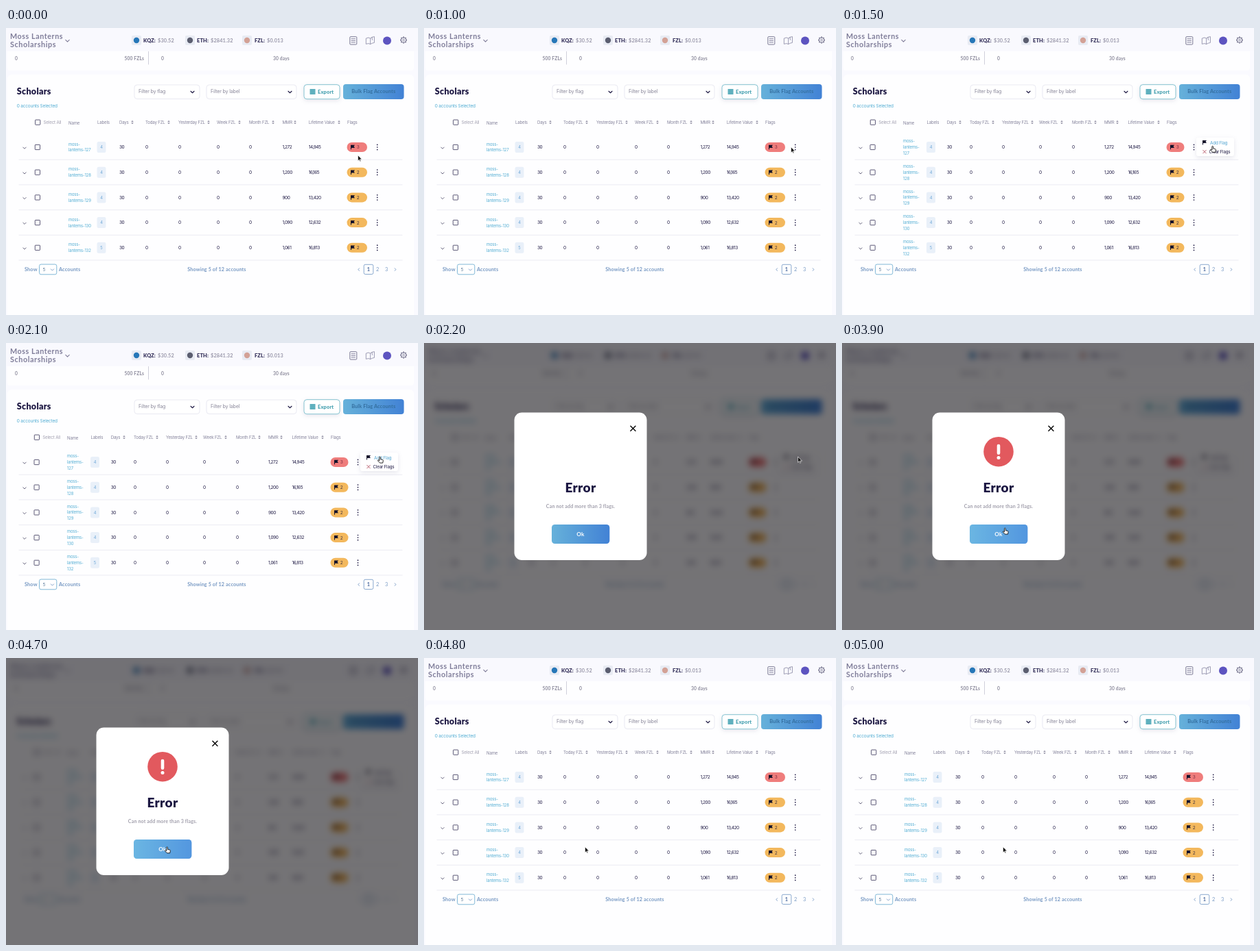
Recreate the animation shown at these times as an HTML page. Size 600 px wide and 419 px high, loop 5.2 s.

```html
<!DOCTYPE html>
<html lang="en">
<head>
<meta charset="utf-8">
<title>Scholars</title>
<style>
  html, body { margin: 0; width: 100%; height: 100%; overflow: hidden; background: #fafaff; }
  svg { display: block; width: 100vw; height: 100vh; }
  text { font-family: Inter, "Open Sans", sans-serif; letter-spacing: -.03em; white-space: pre; }
  .head { font-family: Lato, "Open Sans", sans-serif; letter-spacing: .02em; }
  .title { letter-spacing: .05em; }
  .cell { letter-spacing: -.07em; }
  .soft { filter: drop-shadow(0 2px 3px rgba(60, 60, 110, .13)); }
</style>
</head>
<body>
<svg id="stage" viewBox="0 0 600 419" preserveAspectRatio="none"></svg>
<script>
const LOOP = 5200, STEP = 100;
const INK = '#1d1843', GREY = '#8b899b', BLUE = '#4fabd2', LINE = '#e9e9f2', CARD = '#fefeff';
const TEAM = ['Moss', 'Lanterns'], COIN = 'FZL';

// Drawing helpers
const text = (x, y, s, size, fill = INK, extra = '') =>
  `<text x="${x}" y="${y}" font-size="${size}" fill="${fill}" ${extra}>${s}</text>`;
const head = (x, y, s, size, fill = INK, weight = 700, extra = '', kind = '') =>
  text(x, y, s, size, fill, `class="head ${kind}" font-weight="${weight}" ${extra}`);
const rect = (x, y, w, h, r, fill, stroke = 'none', extra = '') =>
  `<rect x="${x}" y="${y}" width="${w}" height="${h}" rx="${r}" fill="${fill}" stroke="${stroke}" ${extra}/>`;
const path = (d, fill, stroke = 'none', width = 1, extra = '') =>
  `<path d="${d}" fill="${fill}" stroke="${stroke}" stroke-width="${width}" stroke-linecap="round" stroke-linejoin="round" ${extra}/>`;
const dot = (x, y, r, fill) => `<circle cx="${x}" cy="${y}" r="${r}" fill="${fill}"/>`;
const chevron = (x, y, w = 2.5, color = INK, width = 1.1) =>
  path(`M${x - w} ${y - w / 2}l${w} ${w} ${w} ${-w}`, 'none', color, width);
const cross = (x, y, r, color, width) =>
  path(`M${x - r} ${y - r}l${2 * r} ${2 * r}m0 ${-2 * r}l${-2 * r} ${2 * r}`, 'none', color, width);
const checkbox = (x, y) => rect(x, y - 3.6, 7.2, 7.2, .6, '#fff', '#4a4768', 'stroke-width=".9"');
const flag = (x, y) => path(`M${x} ${y + 3.3}v-6.5h6l-1.5 2 1.5 2.1h-5v2.4z`, '#14122b');
const sorter = (x, y) => path(`M${x - 1.8} ${y - .6}l1.8-2 1.8 2zm0 1.3l1.8 2 1.8-2z`, '#8a889d');
const middle = 'text-anchor="middle"';

function topBar() {
  const coins = [
    ['KQZ', '$30.52', 183, 200, 221, '#2677b8'],
    ['ETH', '$2841.32', 261, 278, 298, '#5b5e70'],
    [COIN, '$0.013', 344, 362, 380, '#d3a196']
  ];
  const icon = '#7b7993', name = '#807e9a';
  let teeth = '';
  for (let a = 0; a < 360; a += 45)
    teeth += `<path d="M579 12.6v1.6" stroke="${icon}" stroke-width="1.8" transform="rotate(${a} 579 17.6)"/>`;
  return rect(0, 0, 600, 34, 0, '#f9f9fe') +
    head(6, 16, TEAM.join(' '), 10.8, name, 700, '', 'title') +
    head(6, 27.8, 'Scholarships', 10.9, name, 700, '', 'title') +
    chevron(89.5, 18.8, 2.7, name) +
    coins.map(([code, price, bx, nx, px, color]) =>
      rect(bx, 11, 14, 14, 2, '#e8ebf3') + dot(bx + 7, 18, 4.2, color) +
      head(nx, 21, code + ':', 7.4, '#3a365f', 900) +
      head(px, 21, price, 7.3, '#9a98aa')).join('') +
    rect(500.8, 12.7, 10, 11.4, 1, 'none', icon) +
    path('M503 15.8h5.5M503 18.4h5.5M503 21h5.5', 'none', icon, .9) +
    path('M524.7 15l3.3-1 2.6 1.2 2.5-1.8 3.3-.8v8.8l-3 .8-2.8 1.4-2.7-1-3.2.7zM530.6 15.2v8.2M533 13.4l.4 4', 'none', '#8684a0', .8) +
    dot(555, 18.6, 6, '#5d54c0') +
    teeth + `<circle cx="579" cy="17.6" r="3.7" fill="none" stroke="${icon}"/>` +
    `<circle cx="579" cy="17.6" r="1.4" fill="none" stroke="${icon}" stroke-width=".8"/>`;
}

function panels() {
  return rect(2, 30, 592, 32, 4, CARD) + topBar() +
    head(13, 47, '0', 6.7, GREY) + head(172.5, 47, `500 ${COIN}s`, 6.7, GREY) +
    path('M207.5 34.5V53', 'none', '#d0cfda', 1) +
    head(226, 47, '0', 6.7, GREY) + head(389, 47, '30 days', 6.7, GREY) +
    rect(2, 68, 592, 365, 6, CARD) +
    head(15.8, 96.5, 'Scholars', 12.6, INK, 900) +
    rect(187, 83, 95, 20.5, 4, '#fff', LINE) + text(193, 95.4, 'Filter by flag', 7.2, GREY) + chevron(271.5, 93.5) +
    rect(292, 83, 131, 20.5, 4, '#fff', LINE) + text(298, 95.4, 'Filter by label', 7.2, GREY) + chevron(413.5, 93.5) +
    rect(434, 82.7, 52, 21, 4, '#fff', '#79bdcc', 'class="soft" stroke-width=".9"') +
    rect(442.5, 89, 8, 8, .5, '#5fb0be') + head(454, 95.5, 'Export', 7.4, '#4fa5b4', 900) +
    rect(491, 82, 88.5, 22, 4, 'url(#button)') +
    head(535.2, 95.4, 'Bulk Flag Accounts', 7.3, '#346f9f', 700, middle) +
    text(15.8, 116.3, '0 accounts Selected', 6.5, BLUE) + footer();
}

function footer() {
  const soft = '#7698c3';
  return head(27, 354.8, 'Show', 7.3, soft) +
    rect(48.5, 345, 25.3, 14.8, 2.5, '#fff', '#72afd2', 'stroke-width=".9"') +
    text(53.5, 354.8, '5', 6.8, '#62809f') + chevron(67.5, 353, 2.2, soft, .9) +
    head(77, 354.8, 'Accounts', 7.3, soft) +
    head(307, 354.8, 'Showing 5 of 12 accounts', 7.2, soft, 700, middle) +
    path('M514.5 350.8l-1.6 1.8 1.6 1.8M566.2 350.8l1.6 1.8-1.6 1.8', 'none', soft, .9) +
    rect(521.2, 345.3, 13.6, 14.2, 2, '#fff', '#7c9fc9', 'stroke-width=".9"') +
    head(528, 355, '1', 7.3, '#46659c', 700, middle) +
    head(541.2, 355, '2', 7.3, soft, 400, middle) + head(554.2, 355, '3', 7.3, soft, 400, middle);
}

const rows = [
  [127, 4, '1,272', '14,945', 3], [128, 4, '1,200', '16,165', 2], [129, 4, '900', '13,420', 2],
  [130, 4, '1,090', '12,632', 2], [132, 5, '1,061', '16,813', 2]
];
const titles = ['Days', `Today ${COIN}`, `Yesterday ${COIN}`, `Week ${COIN}`, `Month ${COIN}`, 'MMR', 'Lifetime Value'];

// Column positions with the row menu closed and open
const wide = { box: 42.3, name: 91, label: 132.5, flags: 497, pill: 29.5, more: 540.7,
  cols: [165, 203, 251, 307, 354, 402.5, 440.7], sorts: [184, 237, 295, 340, 389, 421, 485] };
const narrow = { box: 41, name: 89, label: 123, flags: 473, pill: 26, more: 512.5,
  cols: [152.7, 186, 233, 287, 335, 382, 416.5], sorts: [172, 220, 277, 320, 369, 401, 461] };

function table(c, split) {
  const title = '#83819a';
  let out = checkbox(c.box + .3, 137.7) + text(c.box + 12.2, 139.8, 'Select All', 6.3, '#a09eaf') +
    text(c.name, 140.6, 'Name', 6.1, title) + text(c.label + .5, 139.8, 'Labels', 6.1, title) +
    text(c.flags, 139.8, 'Flags', 6.1, title) +
    titles.map((s, i) => text(c.cols[i], 139.8, s, 6.1, title) + sorter(c.sorts[i], 137.6)).join('');
  rows.forEach(([id, labels, mmr, value, flags], i) => {
    const y = 174 + 36.7 * i;
    const lines = split ? [TEAM[0] + '-', TEAM[1] + '-', id] : [TEAM[0] + '-', TEAM[1] + '-' + id];
    const cells = ['30', '0', '0', '0', '0', mmr, value];
    out += path(`M19 ${y + 18.2}H577`, 'none', LINE, .9) +
      chevron(27, y + 1.2, 2.2, '#5a5773', .9) + checkbox(c.box, y) +
      lines.map((s, n) => text(c.name, y + 2 + (n - (lines.length - 1) / 2) * 8.8, String(s).toLowerCase(), 5.9, BLUE)).join('') +
      rect(c.label, y - 8, 13, 16, 2.5, '#e9f0f9') +
      text(c.label + 6.5, y + 2.1, labels, 5.8, '#6aa5d6', middle) +
      cells.map((s, n) => text(c.cols[n], y + 2.3, s, 6.5, INK, 'class="cell"')).join('') +
      rect(c.flags - .5, y - 7, c.pill, 14, 7, flags > 2 ? '#ef7d7c' : '#f3b85d') +
      flag(c.flags + 5, y) + text(c.flags + 13.7, y + 2.4, flags, 6.5, flags > 2 ? '#7c2f42' : '#3d3040') +
      [-3.6, 0, 3.6].map(d => dot(c.more, y + d, .85, INK)).join('');
  });
  return out;
}

function menu() {
  return rect(516, 160, 55, 27, 3, '#fff', 'none', 'class="soft"') +
    flag(525, 167.2) + `<g id="add">${text(536, 169.6, 'Add Flag', 6.4, 'currentColor')}</g>` +
    cross(528, 180.6, 2.3, '#bb6272', 1) + text(534.5, 182.9, 'Clear Flags', 6.2);
}

function dialog() {
  return rect(131.5, 101.5, 193, 215.5, 11, '#fff') + cross(304.4, 124.8, 3.5, '#111', 1.6) +
    `<g id="alert">${dot(0, 0, 21.8, '#e2595e')}` +
    path('M0-8.7V2', 'none', '#fff', 4.6) + dot(0, 8.8, 2.5, '#fff') + '</g>' +
    head(228, 218.4, 'Error', 19, INK, 900, middle) +
    head(228, 240.5, 'Can not add more than 3 flags.', 7.1, '#a09eab', 700, middle) +
    rect(186, 265, 84.3, 28, 4.5, 'url(#button)') +
    `<g id="hover">${rect(186, 265, 84.3, 28, 4.5, '#74bdf0', 'none', 'opacity=".35"')}</g>` +
    head(228, 281.5, 'Ok', 8.2, '#fff', 700, middle);
}

const stage = document.getElementById('stage');
stage.innerHTML = `
  <defs>
    <linearGradient id="button"><stop stop-color="#66b1da"/><stop offset="1" stop-color="#4282d5"/></linearGradient>
    <filter id="blur" filterUnits="userSpaceOnUse" x="0" y="0" width="600" height="419"
      color-interpolation-filters="sRGB"><feGaussianBlur stdDeviation="5"/></filter>
  </defs>
  ${rect(0, 0, 600, 419, 0, '#fafaff')}
  <g id="page">${panels()}<g id="wide">${table(wide, false)}</g><g id="narrow">${table(narrow, true)}${menu()}</g></g>
  <g id="modal">${rect(0, 0, 600, 419, 0, 'rgba(2,0,4,.545)')}${dialog()}</g>
  <g id="cursor">
    <g id="arrow">${path('M0 0V8L1.9 6.3 3.1 9 4.3 8.4 3.1 5.8H5.6Z', '#111', '#fff', .6)}</g>
    <g id="hand">${path('M-.9.8a.9.9 0 0 1 1.8 0V3.4L4 4.1Q4.9 4.4 4.8 5.4L4.2 8.8H0L-3 5.6Q-3.2 4.6-2.2 4.6L-.9 5.4Z', '#fff', '#111', .9)}</g>
  </g>`;

const el = id => document.getElementById(id);
const show = (id, on) => el(id).setAttribute('display', on ? 'inline' : 'none');
const clamp = v => Math.max(0, Math.min(1, v));
const smooth = v => v * v * (3 - 2 * v);

// Pointer stops: time, x, y
const stops = [[0, 512.5, 186], [300, 512.5, 186], [1000, 534.5, 174], [1200, 539, 173.5], [1400, 539, 173.5],
  [1800, 543, 167], [1900, 544.5, 166.3], [3600, 544.5, 166.3], [3900, 237.3, 270.3], [4200, 234.5, 276], [LOOP, 234.5, 276]];

function pointer(t) {
  const i = Math.max(1, stops.findIndex(s => s[0] >= t));
  const [a, b] = [stops[i - 1], stops[i]];
  const k = smooth(clamp((t - a[0]) / (b[0] - a[0])));
  return [a[1] + (b[1] - a[1]) * k, a[2] + (b[2] - a[2]) * k];
}

function draw(t) {
  const open = t >= 1400 && t < 4800;
  const modal = t >= 2200 && t < 4800;
  const onButton = t >= 3900 && t < 4800;
  const onItem = t >= 1500 && t < 2200;
  const hand = onButton || (t >= 1200 && t < 2200);
  show('wide', !open);
  show('narrow', open);
  show('modal', modal);
  show('hover', onButton);
  show('arrow', !hand);
  show('hand', hand);
  el('add').style.color = onItem ? '#4fa3d0' : INK;
  if (modal) el('page').setAttribute('filter', 'url(#blur)');
  else el('page').removeAttribute('filter');
  const grow = 1 - (1 - clamp((t - 2200) / 400)) ** 3;
  el('alert').setAttribute('transform', `translate(228 158.7) scale(${grow})`);
  el('cursor').setAttribute('transform', `translate(${pointer(t)})`);
}

function tick() {
  const t = performance.now() % LOOP;
  draw(Math.floor(t / STEP) * STEP);
  requestAnimationFrame(tick);
}
tick();
</script>
</body>
</html>
```
